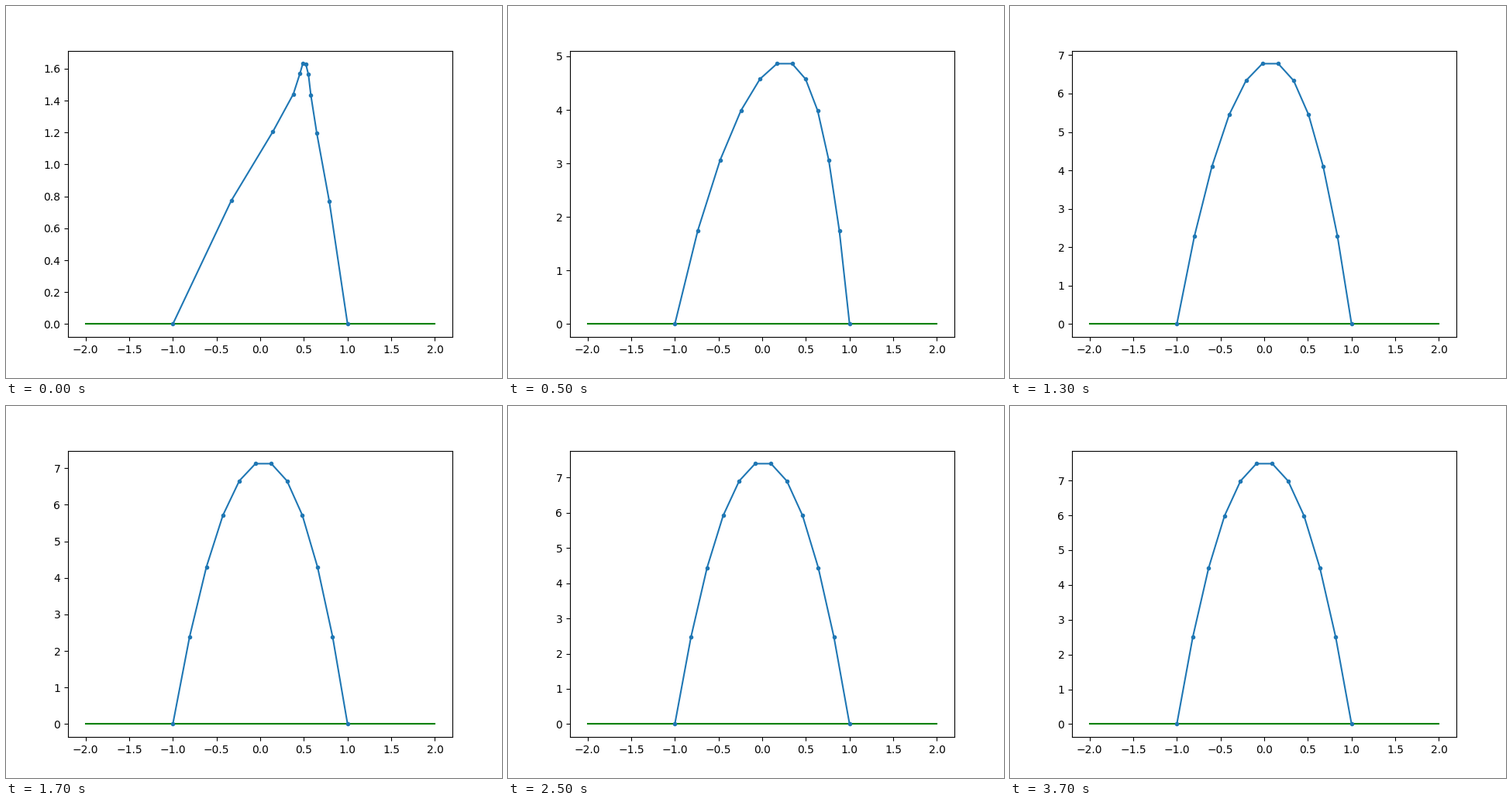
These frames come from a looping animation (640x480 px, 3800 ms). A matplotlib script:

```python
import numpy as np
import matplotlib.pyplot as plt
from matplotlib.animation import FuncAnimation

FRAMES = 38
INTERVAL = 100      # ms
TIME_STEP = 2.0     # diffusion time per frame
SEGMENTS = 11
LOAD = 0.5          # constant upward force on every inner node

# Chain with fixed ends: dp/dt = p[k-1] - 2 p[k] + p[k+1] + load.
# It is solved in sine modes, each decaying at its own rate.
nodes = np.arange(SEGMENTS + 1)
numbers = np.arange(1, SEGMENTS)
modes = np.sin(np.pi * np.outer(nodes, numbers) / SEGMENTS)
rates = 2 - 2 * np.cos(np.pi * numbers / SEGMENTS)

line_x = np.linspace(-1, 1, SEGMENTS + 1)
rest_x = np.zeros(SEGMENTS - 1)
rest_y = LOAD * 2 / SEGMENTS * modes.sum(axis=0) / rates


def low_modes(*amplitudes):
    return np.pad(amplitudes, (0, SEGMENTS - 1 - len(amplitudes)))


start_x = low_modes(0.684, 0.707, 0.325, 0.616, 0.13)
start_y = low_modes(0.761, 0.009, 0.044, 0, 0.18)


def relax(start, rest, time):
    return modes @ (rest + (start - rest) * np.exp(-rates * time))


fig, ax = plt.subplots(figsize=(6.4, 4.8), dpi=100)
ax.plot([-2, 2], [0, 0], color="green")
chain, = ax.plot([], [], ".-", color="C0")
ax.set_xlim(-2.2, 2.2)


def update(frame):
    time = (frame + 1) * TIME_STEP
    y = relax(start_y, rest_y, time)
    chain.set_data(line_x + relax(start_x, rest_x, time), y)
    top = y.max()
    ax.set_ylim(-0.05 * top, 1.05 * top)
    return chain,


anim = FuncAnimation(fig, update, frames=FRAMES, interval=INTERVAL,
                     repeat=True, repeat_delay=0, blit=False)
plt.show()
```
